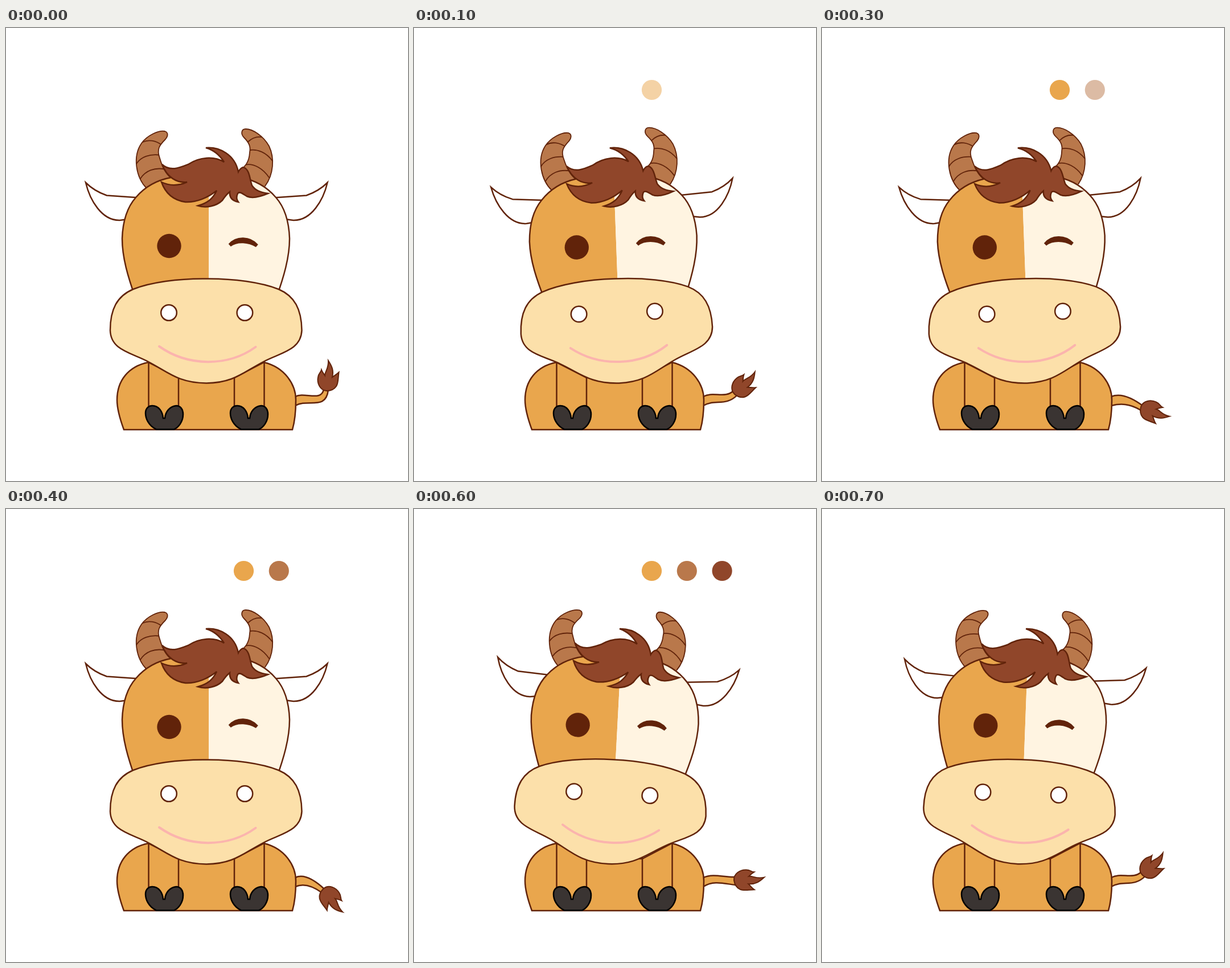
An HTML page with a canvas that plays this animation: 706 by 794 pixels, repeating every 800 ms.

```html
<!DOCTYPE html>
<html lang="en">
<head>
<meta charset="utf-8">
<title>Winking calf</title>
<style>
html, body { margin: 0; width: 100%; height: 100%; overflow: hidden; background: #fff; }
canvas { display: block; }
</style>
</head>
<body>
<canvas id="stage" width="706" height="794"></canvas>
<script>
const ctx = document.getElementById('stage').getContext('2d');
const LINE = '#61230a', TAN = '#e9a64d', HORN = '#b9784b', HAIR = '#90462a';
const CREAM = '#fff4e1', MUZZLE = '#fce0aa', HOOF = '#3a3432', PINK = '#fbb4ae';
const STEP = 100, STEPS = 8;
const PIVOT = [355, 403], TILT = 3 * Math.PI / 180;

const path = d => new Path2D(d);
const shapes = {
  body: path('M207 704C200 685 195 668 195 652C195 618 215 593 250 586L303 613H401L453 586C490 595 509 625 509 652C509 670 507 690 503 704Z'),
  legs: path('M250.5 586V665M303 610V665M401 610V665M453.5 586V665'),
  hoof: path('M264 703.5C250 697 245 684 245 675C245 666 251 662 257 662C268 662 275 672 276 684H279C280 672 288 663 299 662C306 662 311 668 311 677C311 690 303 700 295 703.5Z'),
  tuft: path('M0 0C-12 -1 -17 -14 -15 -24C-14 -31 -10 -32 -9 -37C-7 -32 -5 -30 -3 -27C-3 -34 4 -39 3 -53C9 -44 13 -36 10 -24C14 -27 18 -29 21.5 -32.5C20 -22 21 -14 17 -8C13 -2 8 0 0 0Z'),
  ear: path('M235 297.5L177 293.5C164 289 150 281 140 271C147 301 168 338 200 337L215 335'),
  hornL: path('M247 281C228 262 222 225 238 202C248 188 268 179 279 181C285 183 285 189 280 195C270 205 264 212 270 228C274 242 280 255 289 262L275 285'),
  ringsL: path('M240 200C250 195 263 197 274 205.5M229 238C237 225 253 221 268.5 222.5M236 264C245 250 261 244 279 247.5'),
  hornR: path('M455 277C470 257 472 228 462 207C452 189 433 177 421 177C413 177 412 186 418 192C427 201 430 208 428 218C427 235 420 243 411 249L425 285'),
  ringsR: path('M425 199.5C433 192 443 190 451 191.5M428 214C442 212 457 218 468 233M421 239.5C436 237 452 247 462 262'),
  head: path('M228 475C214 436 204 402 204 369C205 340 212 315 228 297C245 277 268 266 290 262C325 253 377 253 412 262C434 266 457 277 474 297C490 315 497 340 498 369C498 402 488 436 474 475Z'),
  hair: path('M274 239C288 252 305 245 320 239C340 226 365 224 383 235C375 222 365 214 351 210C375 208 402 222 408 252C411 246 416 243 419 245C428 250 428 265 432 276C438 285 447 288 460 290C446 296 432 299 423 295C415 290 410 286 407 290C404 296 405 301 408 305C398 303 392 297 393 287C388 291 384 296 380 302C370 312 352 316 337 311.5C353 307 363 300 370 285C355 297 335 306 315 305C295 302 280 290 273 270C285 276 300 278 318 270C300 272 283 262 274 239Z'),
  wink: path('M393 380.5C405 366.5 428 367 440.5 381.5C427 373 406 371 393 380.5Z'),
  muzzle: path('M351 439.5C302 439 253 446 223 458C195 470 183 493 183 530C184 565 220 569 250 585C285 603 302 622 352 622.5C400 622 417 603 452 585C482 569 518 565 519.5 530C519 493 507 470 479 458C449 446 400 439 351 439.5Z'),
  smile: path('M269 558C320 594 390 594 438.5 559')
};

// Tail from raised to lowered: tuft x, y, degrees; then the upper and lower stem curves
const tails = [
  [563, 636, 0, '524 637 554 656 558 633', '530 649 562 671 566 634'],
  [563, 642, 39, '526 636 546 651 562 635', '528 650 548 664 568 643'],
  [562, 651, 81, '526 638 545 646 564 645', '526 650 546 657 564 659'],
  [560, 664, 105, '525 639 545 648 566 664', '524 658 540 658 560 670'],
  [558, 665, 138, '525 638 545 653 560 667', '524 655 540 662 554 672']
].map(([x, y, deg, top, low]) => {
  const edges = [path('M508 646C' + top), path('M508 662C' + low)];
  const [ax, ay, bx, by, ex, ey] = low.split(' ');
  const fill = path(`M508 646C${top}L${ex} ${ey}C${bx} ${by} ${ax} ${ay} 508 662Z`);
  return { x, y, turn: deg * Math.PI / 180, edges, fill };
});

function draw(shape, fill, stroke, width = 2.5) {
  if (fill) {
    ctx.fillStyle = fill;
    ctx.fill(shape);
  }
  if (stroke) {
    ctx.strokeStyle = stroke;
    ctx.lineWidth = width;
    ctx.stroke(shape);
  }
}

function disc(x, y, r, fill, stroke) {
  const p = new Path2D();
  p.arc(x, y, r, 0, Math.PI * 2);
  draw(p, fill, stroke);
}

function within(change, paint) {
  ctx.save();
  change();
  paint();
  ctx.restore();
}

function drawTail(step) {
  const tail = tails[step <= 4 ? step : STEPS - step];
  draw(tail.fill, TAN);
  tail.edges.forEach(edge => draw(edge, null, LINE));
  within(() => {
    ctx.translate(tail.x, tail.y);
    ctx.rotate(tail.turn);
  }, () => draw(shapes.tuft, HAIR, LINE, 2));
}

function drawBody() {
  draw(shapes.body, TAN, LINE);
  draw(shapes.legs, null, LINE);
  for (const dx of [0, 149]) {
    within(() => ctx.translate(dx, 0), () => draw(shapes.hoof, HOOF, '#000'));
  }
}

function drawHorn(horn, rings) {
  draw(horn, HORN);
  within(() => ctx.clip(horn), () => draw(rings, null, LINE, 1.8));
  draw(horn, null, LINE, 1.8);
}

function drawHead() {
  draw(shapes.ear, '#fff', LINE);
  within(() => ctx.transform(-1, 0, 0, 1, 704.5, 0), () => draw(shapes.ear, '#fff', LINE));
  drawHorn(shapes.hornL, shapes.ringsL);
  drawHorn(shapes.hornR, shapes.ringsR);
  within(() => ctx.clip(shapes.head), () => {
    ctx.fillStyle = TAN;
    ctx.fillRect(190, 240, 166, 250);
    ctx.fillStyle = CREAM;
    ctx.fillRect(356, 240, 160, 250);
  });
  draw(shapes.head, null, LINE);
  draw(shapes.hair, HAIR, LINE);
  disc(286.5, 382, 21.2, LINE);
  draw(shapes.wink, LINE, LINE, 6);
  draw(shapes.muzzle, MUZZLE, LINE);
  disc(286, 499, 13.8, '#fff', LINE);
  disc(419.4, 499, 13.8, '#fff', LINE);
  draw(shapes.smile, null, PINK, 4);
}

// Each dot fades in over two steps; all vanish on the last step
function drawDots(step) {
  if (step === STEPS - 1) return;
  [TAN, HORN, HAIR].forEach((color, i) => {
    const alpha = Math.min(1, Math.max(0, step / 2 - i));
    within(() => { ctx.globalAlpha = alpha; }, () => disc(417.5 + 61.8 * i, 108.5, 17.6, color));
  });
}

function render(now) {
  const step = Math.floor(now / STEP) % STEPS;
  ctx.fillStyle = '#fff';
  ctx.fillRect(0, 0, 706, 794);
  ctx.lineCap = 'round';
  ctx.lineJoin = 'miter';
  ctx.miterLimit = 4;
  drawTail(step);
  drawBody();
  within(() => {
    ctx.translate(...PIVOT);
    ctx.rotate(-TILT * Math.sin(2 * Math.PI * step / STEPS));
    ctx.translate(-PIVOT[0], -PIVOT[1]);
  }, drawHead);
  drawDots(step);
}

const start = performance.now();
function tick() {
  render(performance.now() - start);
  requestAnimationFrame(tick);
}
tick();
</script>
</body>
</html>
```
